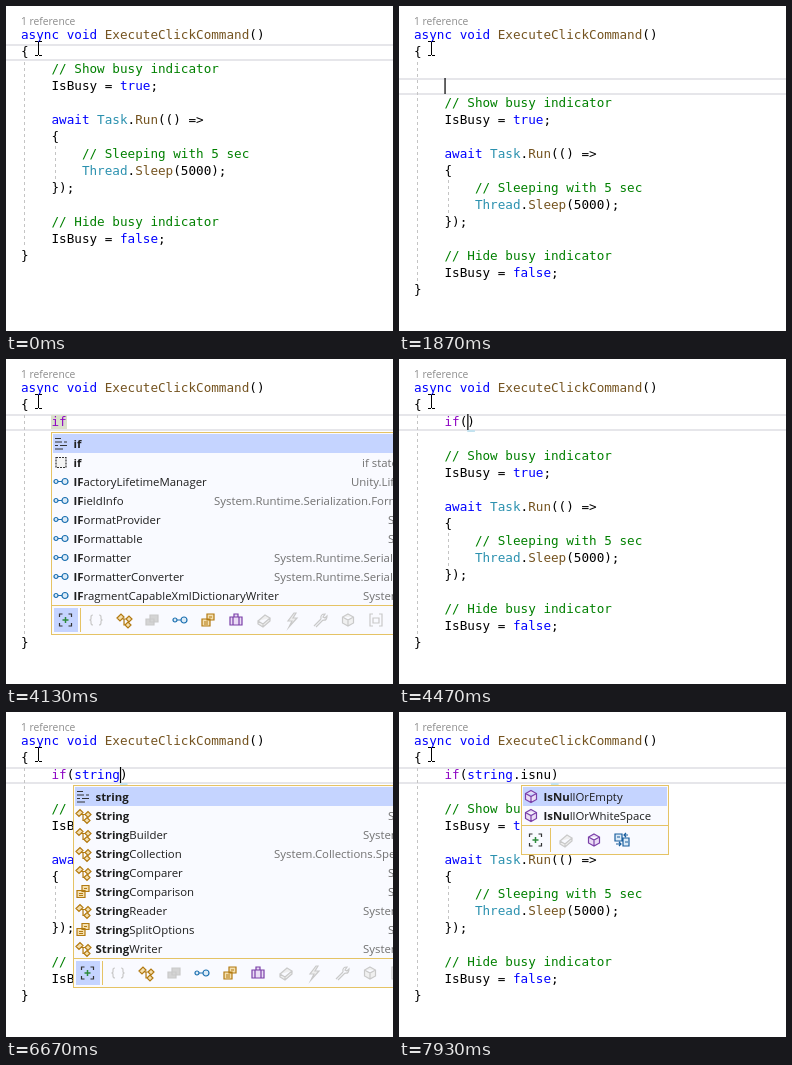
Animation of 387 by 325 pixels, one loop 8000 ms. Source, as an HTML page with a canvas:

```html
<!DOCTYPE html>
<html lang="en">
<head>
<meta charset="utf-8">
<title>Typing in a code editor</title>
<style>
html, body { margin: 0; width: 100%; height: 100%; overflow: hidden; background: #fff; }
canvas { display: block; }
</style>
</head>
<body>
<canvas id="stage" width="387" height="325"></canvas>
<script>
const ctx = document.getElementById('stage').getContext('2d');
const W = 387, H = 325, LOOP = 8000;
const LEFT = 15, TOP = 21, LINE = 17, ROW = 19;
const MONO = '12.65px "DejaVu Sans Mono", monospace';
const UI = '11.4px "Open Sans", sans-serif';
const UI_BOLD = 'bold ' + UI;

const INK = '#000', BLUE = '#0000ff', GREEN = '#008000', TEAL = '#2b91af',
      BROWN = '#74531f', PURPLE = '#8f08c4', GOLD = '#e5c365', FAINT = '#c9c9c9';

ctx.font = MONO;
const ADV = ctx.measureText('0').width;
const colX = col => LEFT + col * ADV;
const rowY = row => TOP + row * LINE;

// Each line: indent, then pairs of text and colour
const head = [
  [0, 'async void ', BLUE, 'ExecuteClickCommand', BROWN, '()', INK],
  [0, '{', INK]
];
const body = [
  [4, '// Show busy indicator', GREEN],
  [4, 'IsBusy = ', INK, 'true', BLUE, ';', INK],
  [0],
  [4, 'await ', BLUE, 'Task', TEAL, '.', INK, 'Run', BROWN, '(() =>', INK],
  [4, '{', INK],
  [8, '// Sleeping with 5 sec', GREEN],
  [8, 'Thread', TEAL, '.', INK, 'Sleep', BROWN, '(5000);', INK],
  [4, '});', INK],
  [0],
  [4, '// Hide busy indicator', GREEN],
  [4, 'IsBusy = ', INK, 'false', BLUE, ';', INK],
  [0, '}', INK]
];

// Icons centred on 0,0: path, stroke, optional fill
const CUBE = 'M0-6L5.5-3V3L0 6L-5.5 3V-3ZM-5.5-3L0 0L5.5-3M0 0V6';
const ERASER = 'M-6 1L1-5L6-2L-1 4ZM-6 1V4L-1 7L6 1V-2M-1 4V7';
const icons = {
  keyword: ['M-6-5H0M-6-1.5H1M3-1.5H6M-6 2H-3M-1 2H6M-6 5.5H2', '#333'],
  snippet: ['M-5-5H5V5H-5Z', '#333', '#f4f4f4'],
  link: ['M-3 0A2 2 0 1 1-7 0A2 2 0 1 1-3 0ZM-3 0H1M7 0A3 3 0 1 1 1 0A3 3 0 1 1 7 0Z', '#1a6fb0', '#dcebf7'],
  braces: ['M-3-5Q-5-5-5-3V-1L-6 0L-5 1V3Q-5 5-3 5M3-5Q5-5 5-3V-1L6 0L5 1V3Q5 5 3 5', FAINT],
  type: ['M-7-2L-3-6L0-3L-4 1ZM2-1L5-4L8-1L5 2ZM1 5L4 2L7 5L4 8ZM-2-1H2M0-1V5H1', '#b27a12', '#f4dfae'],
  stack: ['M-2-5H6V2H-2ZM-6-1H2V5H-6Z', FAINT, '#d4d4d4'],
  list: ['M-1-6H6V0H-1ZM-6-1H2V6H-6ZM1-3H4M-4 2H0M-4 4H0', '#b27a12', '#f4dfae'],
  box: ['M-6-3H6V5H-6ZM-2-3V-6H2V-3M-3-3V5M3-3V5', '#7a3fa8', '#eadcf5'],
  eraser: [ERASER, FAINT, '#eee'],
  bolt: ['M2-7L-4 1H0L-3 7L5-2H1L4-7Z', FAINT, '#eee'],
  wrench: ['M-6 6L1-1M-4 7L3 0M1-1Q0-6 5-6L3-3L5-2L7-4Q7 1 3 0', FAINT],
  cube: [CUBE, FAINT, '#f0f0f0'],
  method: [CUBE, '#7a3fa8', '#eadcf5'],
  field: ['M-3-6H-6V6H-3M3-6H6V6H3M-3-2H3V3H-3Z', FAINT],
  swap: ['M-7-6H0V1H-7ZM1-2H7V6H1ZM-5-3H-2M3 2H6M-6 4H-1M-3 2L-1 4L-3 6M6-5H2M4-7L2-5L4-3', '#1a5f9e', '#dcebf7'],
  expand: ['M-3-6H-6V-3M3-6H6V-3M-3 6H-6V3M3 6H6V3', '#333']
};

const allTools = ['braces', 'type', 'stack', 'link', 'list', 'box', 'eraser', 'bolt', 'wrench', 'cube', 'field'];

// Row: icon, name, hint, hint x
const lists = {
  keyword: {
    x: 45, w: 400, bold: 2, tools: allTools, active: true,
    rows: [
      ['keyword', 'if'],
      ['snippet', 'if', 'if statement', 356],
      ['link', 'IFactoryLifetimeManager', 'Unity.Lifetime', 345],
      ['link', 'IFieldInfo', 'System.Runtime.Serialization.Formatters', 208],
      ['link', 'IFormatProvider', 'System', 382],
      ['link', 'IFormattable', 'System', 382],
      ['link', 'IFormatter', 'System.Runtime.Serialization', 268],
      ['link', 'IFormatterConverter', 'System.Runtime.Serialization', 268],
      ['link', 'IFragmentCapableXmlDictionaryWriter', 'System.Xml', 357]
    ]
  },
  type: {
    x: 67, w: 400, bold: 6, tools: allTools, active: true,
    rows: [
      ['keyword', 'string'],
      ['type', 'String', 'System', 382],
      ['type', 'StringBuilder', 'System.Text', 357],
      ['type', 'StringCollection', 'System.Collections.Specialized', 268],
      ['type', 'StringComparer', 'System', 382],
      ['list', 'StringComparison', 'System', 382],
      ['type', 'StringReader', 'System.IO', 357],
      ['list', 'StringSplitOptions', 'System', 382],
      ['type', 'StringWriter', 'System.IO', 357]
    ]
  },
  member: {
    x: 122, w: 148, bold: 4, tools: ['eraser', 'method', 'swap'],
    rows: [['method', 'IsNullOrEmpty'], ['method', 'IsNullOrWhiteSpace']]
  }
};

// Each step overrides part of the state
const steps = [
  { t: 0, gap: 0, row: 1, caret: false, text: '', mark: false, list: null },
  { t: 70, caret: true },
  { t: 530, caret: false },
  { t: 1000, caret: true, gap: 1, row: 2 },
  { t: 1470, caret: false },
  { t: 1870, caret: true, gap: 2, row: 3 },
  { t: 2330, row: 2 },
  { t: 2870, caret: false },
  { t: 3200, caret: true, text: 'i' },
  { t: 3330, text: 'if' },
  { t: 3470, mark: true },
  { t: 4130, caret: false, list: 'keyword' },
  { t: 4330, caret: true, list: null },
  { t: 4400, text: 'if(' },
  { t: 4470, mark: false },
  { t: 4870, text: 'if(s' },
  { t: 5330, text: 'if(str' },
  { t: 5530, text: 'if(stri' },
  { t: 5800, text: 'if(strin' },
  { t: 5870, text: 'if(string' },
  { t: 6670, list: 'type' },
  { t: 6730, list: null, text: 'if(string.i' },
  { t: 6800, text: 'if(string.is' },
  { t: 6870, text: 'if(string.isn' },
  { t: 6930, text: 'if(string.isnu' },
  { t: 7330, list: 'member' },
  { t: 7930, caret: false }
];

function rect(x, y, w, h, color) {
  ctx.fillStyle = color;
  ctx.fillRect(x, y, w, h);
}

function label(text, x, y, color, font) {
  ctx.font = font;
  ctx.fillStyle = color;
  ctx.fillText(text, x, y);
  return ctx.measureText(text).width;
}

function codeLine([col, ...parts], row) {
  for (let i = 0; i < parts.length; i += 2) {
    label(parts[i], colX(col), rowY(row) + 12, parts[i + 1], MONO);
    col += parts[i].length;
  }
}

function guide(x, from, to) {
  ctx.strokeStyle = '#c4c4c4';
  ctx.lineWidth = 1;
  ctx.setLineDash([3, 3]);
  ctx.beginPath();
  ctx.moveTo(x, from);
  ctx.lineTo(x, to);
  ctx.stroke();
  ctx.setLineDash([]);
}

function icon(name, x, y) {
  const [d, stroke, fill] = icons[name];
  const path = new Path2D(d);
  ctx.save();
  ctx.translate(x, y);
  if (fill) {
    ctx.fillStyle = fill;
    ctx.fill(path);
  }
  ctx.strokeStyle = stroke;
  ctx.lineWidth = 1.2;
  if (name === 'snippet') ctx.setLineDash([2, 1]);
  ctx.stroke(path);
  ctx.restore();
  if (name === 'expand') {
    rect(x - 3, y - 0.75, 6, 1.5, '#2f8a3c');
    rect(x - 0.75, y - 3, 1.5, 6, '#2f8a3c');
  }
}

function popup({ x, w, bold, tools, active, rows }) {
  const top = 73, end = top + 2 + rows.length * ROW, bottom = end + 30;
  rect(x, top, w, bottom - top, GOLD);
  rect(x + 1, top + 1, w - 2, bottom - top - 2, '#f9faff');
  rect(x + 2, top + 2, w - 4, ROW, '#c5d4ff');
  rows.forEach(([kind, name, hint, hintX], i) => {
    const y = top + 2 + i * ROW;
    icon(kind, x + 10, y + 9.5);
    const nameX = x + 22.5;
    const used = label(name.slice(0, bold), nameX, y + 14, '#1e1e1e', UI_BOLD);
    label(name.slice(bold), nameX + used, y + 14, '#1e1e1e', UI);
    if (hint) label(hint, hintX, y + 14, '#717171', UI);
  });
  rect(x + 1, end, w - 2, 1, GOLD);
  if (active) rect(x + 3, end + 3, 24, 24, '#c5d4ff');
  icon('expand', x + 14.5, end + 15);
  rect(x + 29, end + 3, 1, 24, GOLD);
  tools.forEach((name, i) => icon(name, x + 45 + i * 28, end + 15));
}

function pointer() {
  rect(32, 36, 1, 13, INK);
  for (const y of [35, 49]) {
    rect(29, y, 3, 1, INK);
    rect(33, y, 3, 1, INK);
  }
}

function typedLine({ text, mark }) {
  if (!text) return;
  if (mark) rect(45, 56, 16, 14, '#dbe0cc');
  const parts = text.match(/^if|string|[^]/g).flatMap(part =>
    [part, part === 'if' ? PURPLE : part === 'string' ? BLUE : INK]);
  if (text.includes('(')) {
    rect(colX(4 + text.length), 71, ADV, 2, '#c3e2ef');
    parts.push(')', INK);
  }
  codeLine([4, ...parts], 2);
}

function draw(t) {
  const s = Object.assign({}, ...steps.filter(step => step.t <= t));
  const first = 2 + s.gap;
  rect(0, 0, W, H, '#fff');

  const y = rowY(s.row);
  rect(0, y, W, 2, '#e6e6ea');
  rect(0, y + 15, W, 2, '#e6e6ea');

  guide(18.5, rowY(2) + 1, rowY(first + 11));
  guide(49.5, rowY(first + 5), rowY(first + 7));

  label('1 reference', 15, 19, '#8c8c8c', '10.3px "Open Sans", sans-serif');
  head.forEach(codeLine);
  body.forEach((line, i) => codeLine(line, first + i));
  typedLine(s);

  if (s.caret) {
    const col = s.row === 1 ? 1 : 4 + s.text.length;
    rect(colX(col), y, 1.2, 16, INK);
  }
  if (s.list) popup(lists[s.list]);
  pointer();
}

const start = performance.now();
function tick() {
  draw((performance.now() - start) % LOOP);
  requestAnimationFrame(tick);
}
tick();
</script>
</body>
</html>
```
